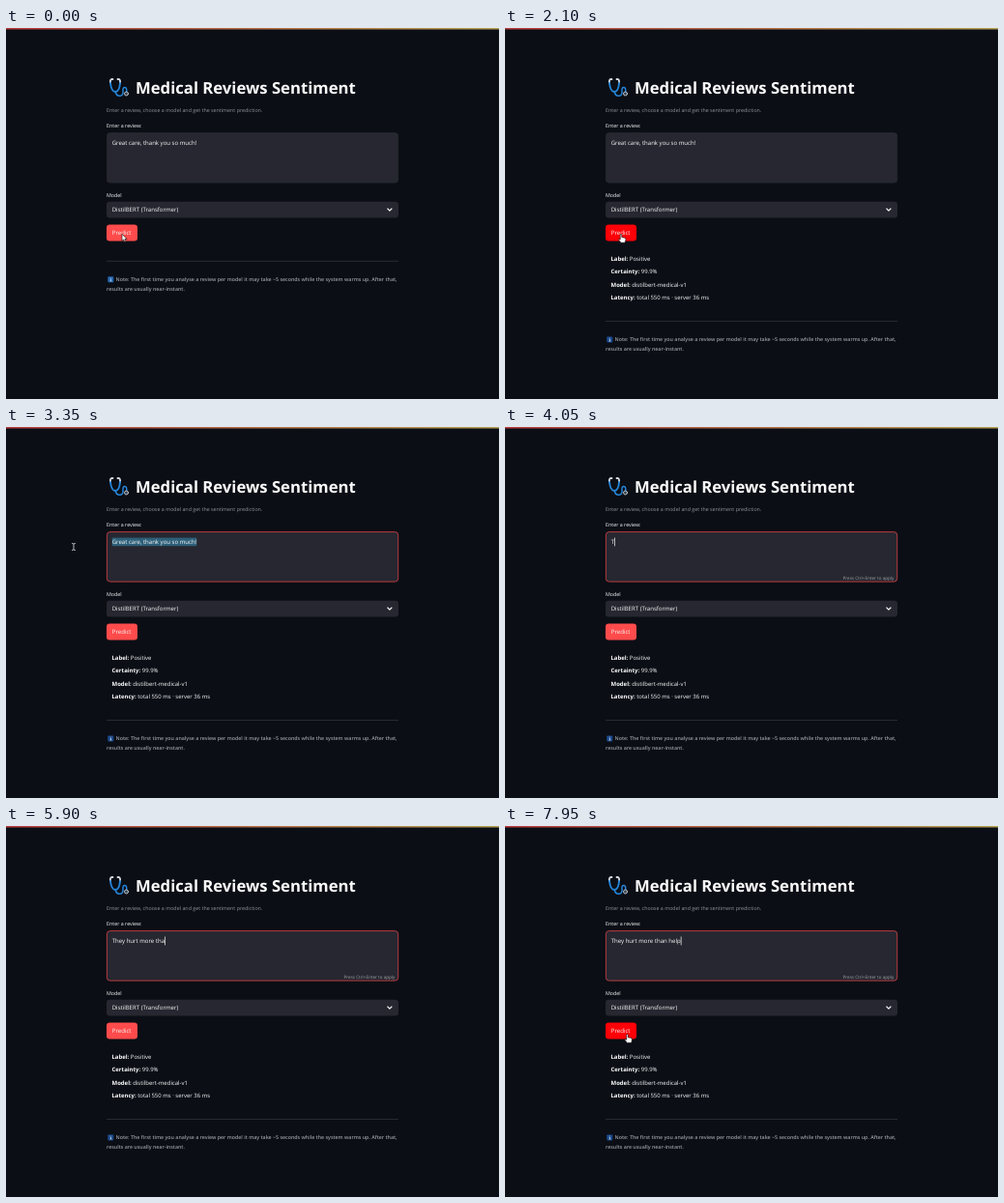
These frames come from a looping animation (510 px wide and 384 px high, 8 s). An HTML page:

```html
<!DOCTYPE html>
<html lang="en">
<head>
<meta charset="utf-8">
<title>Medical Reviews Sentiment</title>
<style>
  html, body { margin: 0; height: 100%; overflow: hidden; background: #0b0e15; }
  svg { display: block; width: 100vw; height: 100vh; }
  text {
    font: 6.05px "Open Sans", "Noto Sans", sans-serif;
    fill: #fafafa;
    text-rendering: geometricPrecision;
    white-space: pre;
  }
  .title { font-size: 16.7px; font-weight: 700; }
  .small { font-size: 5.35px; }
  .muted { fill: #92949a; }
  .note { font-size: 5.3px; font-weight: 600; fill: #9c9ea3; }
  .hint { font-size: 4.6px; fill: #a0a2a8; text-anchor: end; }
  .result { font-size: 5.97px; }
  .result tspan { font-weight: 700; }
  .field { fill: #262730; }
  .line { fill: none; stroke-linecap: round; stroke-linejoin: round; }
  .cursor path { stroke-linejoin: round; }
</style>
</head>
<body>
<svg viewBox="0 0 510 384" preserveAspectRatio="none">
  <defs>
    <linearGradient id="bar">
      <stop offset="0" stop-color="#b63a3c"/>
      <stop offset="1" stop-color="#b3a052"/>
    </linearGradient>
  </defs>
  <rect width="510" height="384" fill="#0b0e15"/>
  <rect width="510" height="1.5" fill="url(#bar)"/>

  <g class="line">
    <path d="M110.5 53H109.500Q107.500 53 108 57M115.500 53H116.500Q118.500 53 118 57" stroke="#d5dbe2" stroke-width="1.8"/>
    <path d="M108 57Q109 66 113.200 66Q117.300 66 118 57" stroke="#2585d8" stroke-width="1.9"/>
    <path d="M113.200 66Q114 70.500 118 70.300Q121.500 70 121 65Q120.600 61.300 123 61.600Q125.200 62 124.700 66" stroke="#2585d8" stroke-width="1.5"/>
    <circle cx="124.500" cy="68" r="2" fill="#39424d" stroke="#c4ccd5" stroke-width=".9"/>
  </g>
  <text class="title" x="134" y="67.800">Medical Reviews Sentiment</text>
  <text class="small muted" x="104" y="86.800">Enter a review, choose a model and get the sentiment prediction.</text>

  <text class="small" x="104" y="103.300">Enter a review:</text>
  <rect id="area" class="field" x="104.400" y="108.600" width="301.300" height="51.500" rx="3.300" stroke-width=".9"/>
  <rect id="selection" y="114.600" height="8.600" fill="#2d5f78"/>
  <text id="review" x="109.700" y="121"></text>
  <rect id="caret" y="114.500" width=".7" height="8.800" fill="#fafafa"/>
  <text id="hint" class="hint" x="402.300" y="157.600">Press Ctrl+Enter to apply</text>

  <text class="small" x="104" y="174.700">Model</text>
  <rect class="field" x="104" y="179.700" width="302" height="16.800" rx="3.300"/>
  <text x="109.700" y="190.200">DistilBERT (Transformer)</text>
  <path class="line" d="M394.800 187L396.900 189.100L399 187" stroke="#fafafa" stroke-width="1.100"/>

  <rect id="button" x="104" y="203.500" width="32" height="17" rx="3.300"/>
  <text x="109.800" y="214.200">Predict</text>

  <g id="results">
    <text class="result" x="109.500" y="240.700"><tspan>Label:</tspan> Positive</text>
    <text class="result" x="109.500" y="254.100"><tspan>Certainty:</tspan> 99.9%</text>
    <text class="result" x="109.500" y="267.600"><tspan>Model:</tspan> distilbert-medical-v1</text>
    <text class="result" x="109.500" y="281"><tspan>Latency:</tspan> total 550 ms · server 36 ms</text>
  </g>

  <g id="footer">
    <rect x="104" y="240.900" width="302" height=".6" fill="#3b3e45"/>
    <rect id="badge" x="105.300" y="257.200" width="6" height="6" rx=".8"/>
    <path d="M107.700 259.700H108.500V261.800M107.500 261.900H109.300M108.300 258.300V258.700" stroke="#e4edf7" stroke-width=".65" fill="none"/>
    <text class="note" x="113.600" y="262.200">Note: The first time you analyse a review per model it may take ~5 seconds while the system warms up. After that,</text>
    <text class="note" x="104" y="271.500">results are usually near-instant.</text>
  </g>

  <g id="pointer" class="cursor">
    <path id="arrow" d="M0 0V7.200L1.700 5.700L2.800 8.200L4 7.700L2.900 5.300H5.100Z" fill="#fff" stroke="#000" stroke-width=".6"/>
    <path id="hand" d="M-.8 .6Q0-.6 .8 .6V3.500Q1.700 2.900 2.200 3.700Q3.100 3.200 3.500 4.100Q4.800 3.700 4.900 5Q5 7.200 4 9H-.2Q-1.300 7.400-2.500 5.900Q-2.600 4.600-.8 5.700Z" fill="#fff" stroke="#000" stroke-width=".6"/>
    <g id="ibeam" class="line">
      <path d="M-1.500-3.500Q0-3.500 0-2.800Q0-3.500 1.500-3.500M0-2.800V2.800M-1.500 3.500Q0 3.500 0 2.800Q0 3.500 1.500 3.500" stroke="#c9ccd1" stroke-width=".9"/>
    </g>
  </g>
</svg>
<script>
  const DURATION = 8000;
  const HOVER_START = 100, RESULTS_AT = 1450;
  const DRAG_START = 2800, DRAG_END = 3250;
  const TYPE_START = 3906, KEY_TIME = 106, BLINK = 530;
  const POINTER_BACK = 6900;
  const TEXT_X = 109.7;
  const OLD_REVIEW = "Great care, thank you so much!";
  const NEW_REVIEW = "They hurt more than help";
  const TYPED_AT = TYPE_START + KEY_TIME * NEW_REVIEW.length;

  // time, x, y
  const PATH = [
    [0, 120, 213.2], [2250, 120, 213.2], [2720, 199, 119],
    [DRAG_START, 199, 119], [DRAG_END, 70, 124],
    [POINTER_BACK, 70, 124], [7000, 70, 125.6],
    [7080, 70, 125.6], [7700, 126.500, 215.500], [DURATION, 126.500, 215.500]
  ];

  const el = Object.fromEntries([...document.querySelectorAll("[id]")].map(n => [n.id, n]));
  const show = (node, on) => node.setAttribute("visibility", on ? "visible" : "hidden");
  const set = (node, attrs) => {
    for (const name in attrs) node.setAttribute(name, attrs[name]);
  };
  const inside = ([x, y], left, top, right, bottom) =>
    x >= left && x <= right && y >= top && y <= bottom;

  function pointerAt(t) {
    const i = PATH.findIndex(p => p[0] > t);
    const [t0, x0, y0] = PATH[i - 1], [t1, x1, y1] = PATH[i];
    const u = (t - t0) / (t1 - t0), e = u * u * (3 - 2 * u);
    return [x0 + (x1 - x0) * e, y0 + (y1 - y0) * e];
  }

  function drawReview(t, pos) {
    const typed = Math.max(0, Math.floor((t - TYPE_START) / KEY_TIME));
    const editing = typed > 0, focused = t >= DRAG_START;
    const value = editing ? NEW_REVIEW.slice(0, typed) : OLD_REVIEW;
    if (el.review.textContent !== value) el.review.textContent = value;

    const end = TEXT_X + el.review.getComputedTextLength();
    const start = Math.min(end, Math.max(TEXT_X, pos[0]));
    const selecting = focused && !editing;
    show(el.selection, selecting);
    if (selecting) set(el.selection, { x: start, width: end - start });

    const lit = t < TYPED_AT || Math.floor((t - TYPED_AT) / BLINK) % 2 === 0;
    show(el.caret, editing && lit);
    set(el.caret, { x: end + .1 });
    show(el.hint, editing);
    set(el.area, { stroke: focused ? "#c84044" : "#262730" });
    return editing;
  }

  function drawPointer(t, pos, editing) {
    const onButton = t >= HOVER_START && inside(pos, 104, 203, 136, 221);
    const onSelect = inside(pos, 104, 180, 406, 196.5);
    const dragging = t >= DRAG_START && t < POINTER_BACK;
    const kind = onButton || onSelect ? "hand"
      : dragging || inside(pos, 104, 108, 406, 160) ? "ibeam" : "arrow";
    const visible = !editing || t >= POINTER_BACK;
    for (const name of ["arrow", "hand", "ibeam"]) show(el[name], visible && name === kind);
    set(el.pointer, { transform: `translate(${pos[0]} ${pos[1]})` });
    set(el.button, { fill: onButton ? "#ff0008" : "#ff4b4b" });
  }

  function draw(now) {
    const t = now % DURATION, pos = pointerAt(t);
    const done = t >= RESULTS_AT;
    show(el.results, done);
    set(el.footer, { transform: `translate(0 ${done ? 62.2 : 0})` });
    set(el.badge, { fill: done ? "#1b4a8c" : "#2465ad" });
    drawPointer(t, pos, drawReview(t, pos));
  }

  const origin = performance.now();
  function tick() {
    draw(performance.now() - origin);
    requestAnimationFrame(tick);
  }
  tick();
</script>
</body>
</html>
```
